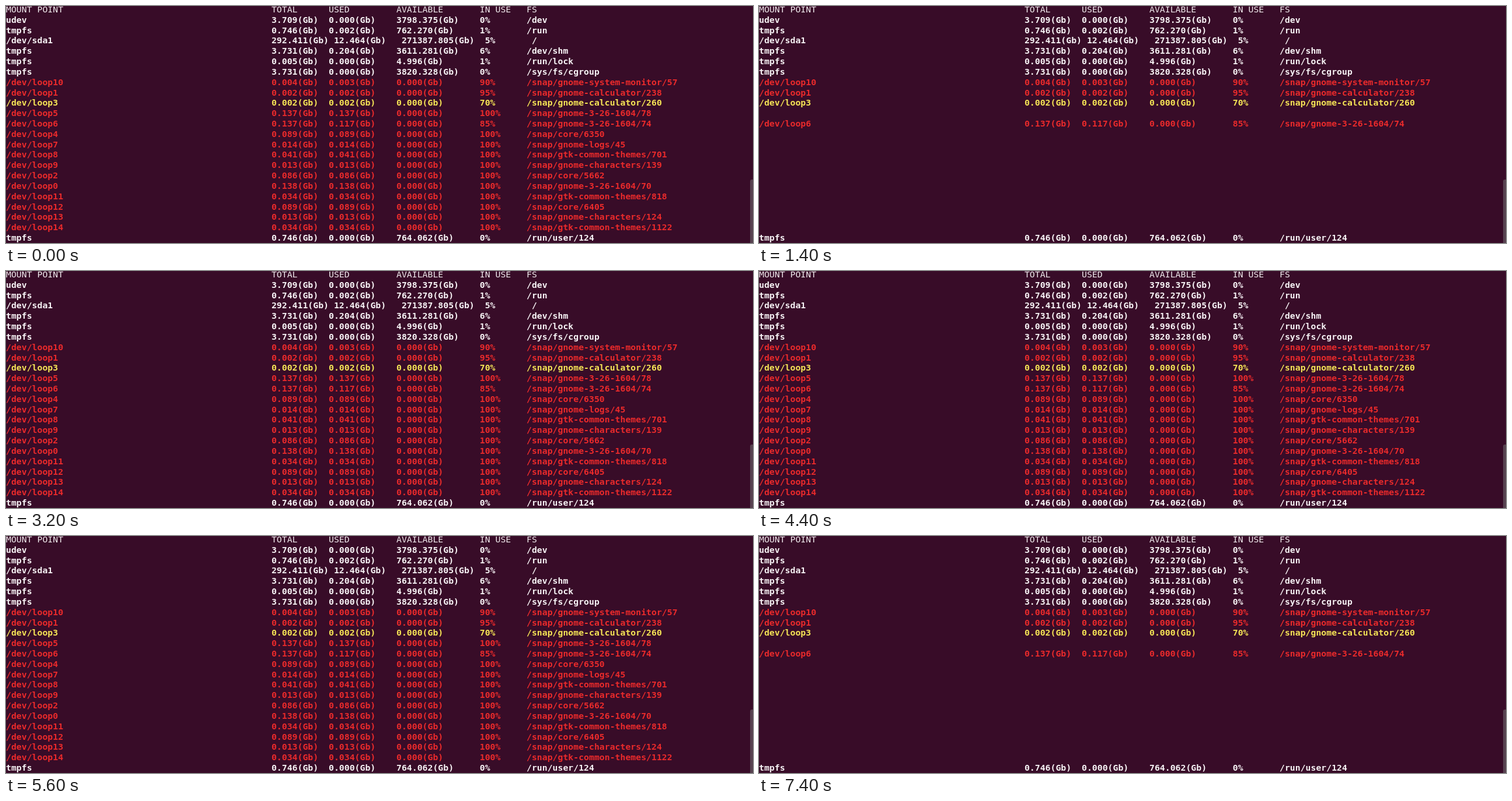
Write an HTML page that moves like this. It is 1280 px wide and 407 px high and loops after 8 s.

```html
<!DOCTYPE html>
<html lang="en">
<head>
<meta charset="utf-8">
<title>Disk usage</title>
<style>
  html, body { margin: 0; width: 100%; height: 100%; overflow: hidden; background: #380c28; }
  svg { display: block; width: 100%; height: 100%; font: bold 14.82px "DejaVu Sans Mono", "Noto Sans Mono", monospace; }
  text { white-space: pre; }
  .head { font-weight: normal; fill: #f0eaed; }
  .ok { fill: #f7f3f5; }
  .warn { fill: #f6e555; }
  .full { fill: #ea2a2b; }
</style>
</head>
<body>
<svg id="screen" viewBox="0 0 1280 407">
  <rect width="1280" height="407" fill="#380c28"/>
  <path d="M1275 407V301q0-3 3-3h2v109z" fill="#574250"/>
</svg>
<script>
const CHAR = 8.92, LINE = 17.82, BASE = 11;
const COLUMNS = [0, 51, 62, 75, 91, 100];
const LOOP = 8000;
const TOGGLES = [200, 800, 1400, 2400, 2600, 3200, 3800, 4400, 5000, 5600, 6200, 6800, 7400];

// mount, total, used, available, percent, path
const MOUNTS = `
udev 3.709 0.000 3798.375 0 /dev
tmpfs 0.746 0.002 762.270 1 /run
/dev/sda1 292.411 12.464 271387.805 5 /
tmpfs 3.731 0.204 3611.281 6 /dev/shm
tmpfs 0.005 0.000 4.996 1 /run/lock
tmpfs 3.731 0.000 3820.328 0 /sys/fs/cgroup
/dev/loop10 0.004 0.003 0.000 90 /snap/gnome-system-monitor/57
/dev/loop1 0.002 0.002 0.000 95 /snap/gnome-calculator/238
/dev/loop3 0.002 0.002 0.000 70 /snap/gnome-calculator/260
/dev/loop5 0.137 0.137 0.000 100 /snap/gnome-3-26-1604/78
/dev/loop6 0.137 0.117 0.000 85 /snap/gnome-3-26-1604/74
/dev/loop4 0.089 0.089 0.000 100 /snap/core/6350
/dev/loop7 0.014 0.014 0.000 100 /snap/gnome-logs/45
/dev/loop8 0.041 0.041 0.000 100 /snap/gtk-common-themes/701
/dev/loop9 0.013 0.013 0.000 100 /snap/gnome-characters/139
/dev/loop2 0.086 0.086 0.000 100 /snap/core/5662
/dev/loop0 0.138 0.138 0.000 100 /snap/gnome-3-26-1604/70
/dev/loop11 0.034 0.034 0.000 100 /snap/gtk-common-themes/818
/dev/loop12 0.089 0.089 0.000 100 /snap/core/6405
/dev/loop13 0.013 0.013 0.000 100 /snap/gnome-characters/124
/dev/loop14 0.034 0.034 0.000 100 /snap/gtk-common-themes/1122
tmpfs 0.746 0.000 764.062 0 /run/user/124`.trim().split("\n").map(row => row.split(" "));

const svg = document.getElementById("screen");
const make = (tag, attrs, parent) => {
  const node = document.createElementNS("http://www.w3.org/2000/svg", tag);
  for (const key in attrs) node.setAttribute(key, attrs[key]);
  return parent.appendChild(node);
};

function addRow(index, cells, style) {
  const row = make("g", { class: style }, svg);
  let shift = 0;
  cells.forEach((cell, i) => {
    const x = (COLUMNS[i] + shift) * CHAR;
    make("text", { x, y: BASE + index * LINE }, row).textContent = cell;
    // a cell as wide as its column pushes the rest along
    if (i < 5 && cell.length >= COLUMNS[i + 1] - COLUMNS[i]) shift++;
  });
  return row;
}

const level = percent => percent > 80 ? "full" : percent >= 70 ? "warn" : "ok";
const size = value => value + "(Gb)";

addRow(0, ["MOUNT POINT", "TOTAL", "USED", "AVAILABLE", "IN USE", "FS"], "head");
const blinking = [];
MOUNTS.forEach(([mount, total, used, free, percent, path], i) => {
  const cells = [mount, size(total), size(used), size(free), percent + "%", path];
  const row = addRow(i + 1, cells, level(+percent));
  if (percent === "100") blinking.push(row);
});

function draw(time) {
  const shown = TOGGLES.filter(at => at <= time).length % 2 === 0;
  for (const row of blinking) row.setAttribute("visibility", shown ? "visible" : "hidden");
}

const start = performance.now();
function tick() {
  draw((performance.now() - start) % LOOP);
  requestAnimationFrame(tick);
}
tick();
</script>
</body>
</html>
```
